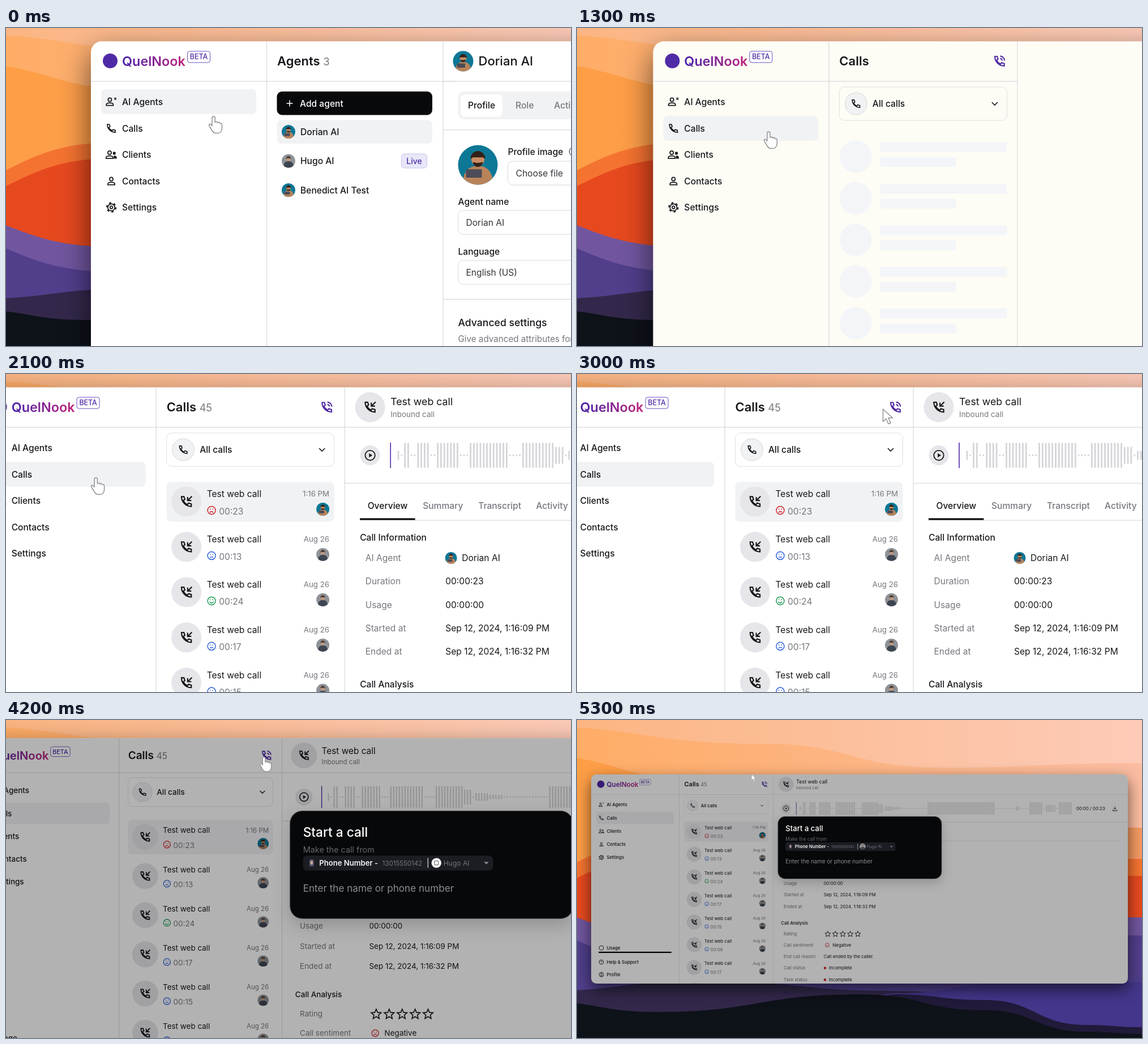
Recreate the animation shown at these times as an HTML page. Size 998 by 561 pixels, loop 5.6 s.

```html
<!DOCTYPE html>
<html lang="en">
<head>
<meta charset="utf-8">
<title>Call centre walkthrough</title>
<style>
html, body { margin: 0; width: 100%; height: 100%; overflow: hidden; background: #0d1119; }
svg { display: block; width: 998px; height: 561px; font-family: Inter, sans-serif; }
text { white-space: pre; }
.shadow { filter: drop-shadow(0 20px 27px rgba(0, 0, 0, .6)); }
.glow { filter: drop-shadow(0 14px 18px rgba(0, 0, 0, .18)); }
</style>
</head>
<body>
<svg id="stage" viewBox="0 0 998 561"></svg>
<script>
const INK = '#17181c', GRAY = '#77777f', LINE = '#d9d9de', SOFT = '#f1f2f4', DISC = '#e6e6ea', BONE = '#f4f5f9',
  PURPLE = '#4f2aa6', RED = '#d3222c', BLUE = '#2f62d9', GREEN = '#1f9d55';
const PERSONA = 'Dorian AI', SECOND = 'Hugo AI';

// Drawing helpers; y of a text is the middle of its capitals
const text = (x, y, s, size = 15.6, fill = INK, weight = 400, anchor = 'start') =>
  `<text x="${x}" y="${y + size * .36}" font-size="${size}" fill="${fill}" font-weight="${weight}" text-anchor="${anchor}">${s}</text>`;
const rect = (x, y, w, h, r, fill, stroke = 'none', more = '') =>
  `<rect x="${x}" y="${y}" width="${w}" height="${h}" rx="${r}" fill="${fill}" stroke="${stroke}" ${more}/>`;
const disc = (x, y, r, fill = 'none', more = '') => `<circle cx="${x}" cy="${y}" r="${r}" fill="${fill}" ${more}/>`;
const path = (d, fill = 'none', more = '') => `<path d="${d}" fill="${fill}" ${more}/>`;
const hline = (x, y, to) => rect(x, y - .5, to - x, 1.2, 0, LINE);
const vline = x => rect(x - .5, 23, 1.2, 740, 0, LINE);
const repeat = (n, draw) => Array.from({ length: n }, (_, i) => draw(i)).join('');

const PHONE = 'M4 4h4l1.5 4.5-2.5 2a14 14 0 0 0 6.5 6.5l2-2.5L20 16v4A16 16 0 0 1 4 4z';
const PERSON = 'M12 4.5a3.5 3.5 0 1 1 0 7a3.5 3.5 0 0 1 0-7M5 19.5v-1.5c0-2.5 4-3.5 7-3.5s7 1 7 3.5v1.5z';
const ICONS = {
  phone: path(PHONE),
  inbound: path(PHONE + 'M21 3.5l-6.5 6.5M14 4.5V10.3h6'),
  talk: path(PHONE + 'M13 3.5a8 8 0 0 1 7.5 7.5M13 7.5a4 4 0 0 1 3.5 3.5'),
  person: path(PERSON),
  agent: path(PERSON, 'none', 'transform="translate(-3 0)"') + path('M18 4l4 4m0-4l-4 4', 'none', 'stroke-width="1.6"'),
  people: path(PERSON, 'none', 'transform="translate(-3.5 0)"') +
    disc(18, 9, 1.9, 'currentColor') + path('M18 15c2 0 4 1 4 3v1h-4z', 'currentColor'),
  account: disc(12, 12, 9) + disc(12, 9.5, 2.5) + path('M6 18.5q6-5.500 12 0'),
  gear: disc(12, 12, 7) + disc(12, 12, 2.6) + disc(12, 12, 9.2, 'none', 'stroke-width="2.5" stroke-dasharray="4.4 5.234"'),
  ring: disc(12, 12, 9),
  help: disc(12, 12, 9) + path('M9.5 10a2.5 2.5 0 1 1 3.5 2.3q-1 .5-1 1.7M12 16v1.5'),
  play: disc(12, 12, 9.5) + path('M10 8l6.5 4-6.5 4z', 'currentColor', 'stroke="none"'),
  down: path('M6 9l6 6 6-6'),
  save: path('M12 4v11M7 11l5 5 5-5M4 17v4h16v-4'),
  star: path('M12 2l3 7 7.5.6-5.7 5 1.7 7.4-6.5-4-6.5 4 1.7-7.4-5.7-5L9 9z')
};
const icon = (name, x, y, size = 21, color = INK) =>
  `<g transform="translate(${x} ${y}) scale(${size / 24}) translate(-12 -12)" fill="none" stroke="currentColor" color="${color}" stroke-width="2">${ICONS[name]}</g>`;

const MOODS = { [RED]: 'M-3.2 4q3.2-4 6.4 0', [BLUE]: 'M-3 2.5h6', [GREEN]: 'M-3.5 1.5q3.5 4.5 7 0' };
const mood = (x, y, color) => `<g transform="translate(${x} ${y})" stroke="${color}" stroke-width="1.5">` +
  disc(0, 0, 7) + path(MOODS[color] + 'M-3-2h1.5M1.5-2h1.5') + '</g>';

const LOOKS = [['#0d7796', '#b9835a', '#c98d66', '#33221a'], ['#8f9398', '#3d4552', '#bd9880', '#4c3c33']];
const avatar = (x, y, r, look = 0) => {
  const [back, coat, skin, hair] = LOOKS[look];
  return `<g transform="translate(${x} ${y}) scale(${r})">` + disc(0, 0, 1, back) +
    path('M-.74 .67A1 1 0 0 0 .74 .67Q.6 .05 0 .05T-.74 .67z', coat) + disc(0, -.27, .33, skin) +
    path('M-.37-.3a.37.4 0 0 1 .74 0l-.12-.08h-.5z', hair) +
    (look ? '' : path('M-.25-.15q.25.1.5 0a.25.25 0 0 1-.5 0', hair) + rect(-.6, .22, .8, .42, .05, '#4c4b58')) + '</g>';
};

// Smooth hill line through the points, filled down to the bottom edge
const wave = (fill, ...p) => path(p.reduce((d, [x, y], i) => {
  if (!i) return `M${x} ${y}`;
  const [px, py] = p[i - 1], mid = (px + x) / 2;
  return `${d}C${mid} ${py} ${mid} ${y} ${x} ${y}`;
}, '') + 'V561H0z', fill);
const gradient = (id, from, to) => `<linearGradient id="${id}"><stop stop-color="${from}"/><stop offset="1" stop-color="${to}"/></linearGradient>`;

const backdrop = rect(0, 0, 998, 561, 0, 'url(#sky)') +
  wave('url(#dawn)', [-100, 10], [330, 42], [640, 84], [998, 76]) +
  wave('url(#noon)', [-100, 60], [250, 110], [600, 150], [998, 190]) +
  wave('#f57331', [-170, 290], [190, 202], [998, 245]) +
  wave('#e7491f', [-170, 318], [190, 230], [998, 275]) +
  wave('#71569f', [-170, 318], [190, 386], [998, 348]) +
  wave('#513f8c', [-170, 356], [190, 430], [998, 380]) +
  wave('#33284b', [-60, 478], [220, 460], [560, 478], [998, 540]) +
  wave('#44368a', [560, 482], [780, 462], [998, 462]) +
  wave('#211a3a', [560, 484], [720, 494], [900, 538], [998, 542]) +
  wave('#0e1219', [-60, 497], [140, 515], [500, 484], [720, 512], [900, 550], [998, 554]);

const NAV = [['agent', 'AI Agents', 130], ['phone', 'Calls', 177], ['people', 'Clients', 223.5], ['person', 'Contacts', 270],
  ['gear', 'Settings', 316.5], ['ring', 'Usage', 635.5], ['help', 'Help &amp; Support', 685.5], ['account', 'Profile', 729.5]];
const sidebar = disc(34, 58, 13, PURPLE) + text(55, 58.5, 'QuelNook', 23.4, 'url(#brand)', 600) +
  rect(170.5, 41, 40, 20, 4, '#fff', '#6a4fc0') + text(190.5, 51, 'BETA', 12.4, PURPLE, 500, 'middle') +
  `<g id="active">${rect(18, 108, 274, 44, 8, SOFT)}</g>` +
  NAV.map(([name, label, y]) => icon(name, 36, y) + text(55, y, label, 15.6, INK, 500)).join('') +
  rect(26, 649, 258, 4.5, 2, '#000') + vline(310.5) + hline(0, 94, 643.5);

const field = (x, y, label) => rect(x, y, 700, 42, 9, '#fff', LINE) + text(x + 14, y + 21, label, 15.6, '#333439');
const agentRow = (y, label, look) => avatar(349, y, 12, look) + text(370, y, label, 15.6, INK, 500);
const agents = vline(622) + hline(622, 94, 1896) + text(329, 58.5, 'Agents', 22, INK, 600) + text(410.5, 60, '3', 18, GRAY) +
  rect(328.5, 112, 274.5, 41.5, 9, '#08090b') + path('M345.5 133h11M351 127.5v11', 'none', 'stroke="#fff" stroke-width="1.5"') +
  text(369, 133, 'Add agent', 15.6, '#fff', 500) + rect(328.5, 162.5, 274.5, 41.5, 8, SOFT) +
  agentRow(183, PERSONA, 0) + agentRow(234.5, SECOND, 1) + agentRow(286, 'Benedict AI Test', 0) +
  rect(548.5, 222, 45, 25, 5, '#e7e7f8', '#c6c4ee') + text(571, 234.5, 'Live', 14, PURPLE, 500, 'middle') +
  avatar(657.5, 58.5, 18) + text(684.5, 58.5, PERSONA, 22, INK, 500) +
  rect(648.5, 112, 700, 49, 10, SOFT) + rect(653, 117, 74, 39.5, 8, '#fff') + text(666, 136.5, 'Profile', 15.6, INK, 500) +
  text(750, 136.5, 'Role', 15.6, GRAY, 500) + text(818, 136.5, 'Actions', 15.6, GRAY, 500) + hline(622, 179.5, 1896) +
  avatar(683.5, 241.5, 35) + text(736.5, 218.5, 'Profile image', 15.6, INK, 500) + disc(853, 218, 8, 'none', `stroke="${INK}"`) +
  field(736.5, 235, 'Choose file') + text(648.5, 306.5, 'Agent name', 15.6, INK, 500) + field(648.5, 322, PERSONA) +
  text(648.5, 394, 'Language', 15.6, INK, 500) + field(648.5, 410, 'English (US)') + hline(622, 478.5, 1896) +
  text(648.5, 519.5, 'Advanced settings', 17.6, INK, 500) + text(648.5, 549, 'Give advanced attributes for this agent', 15.2, GRAY);

const listHead = vline(643.5) + text(329, 58.5, 'Calls', 22, INK, 600) + icon('talk', 612, 58.5, 25, PURPLE) +
  rect(329, 104, 296, 59, 9, 'none', '#dfdfe4') + disc(358.5, 133.5, 19.5, SOFT, 'stroke="#d6d6dc"') + icon('phone', 358.5, 133.5, 20) +
  text(387.5, 133.5, 'All calls', 15.6, INK, 500) + icon('down', 603.5, 133.5, 20);

const skeleton = repeat(8, i => {
  const y = 227 + 73.4 * i;
  return disc(358, y, 28.5, BONE) + rect(400.5, y - 25.5, 224.5, 17, 2, BONE) + rect(400.5, y + 1, 134.5, 17, 2, BONE);
});

const CALLS = [['23', RED], ['13', BLUE], ['24', GREEN], ['17', BLUE], ['15', BLUE], ['08', BLUE], ['17', BLUE], ['12', BLUE]];
const callRow = ([seconds, color], i) => `<g transform="translate(0 ${79.9 * i})">` +
  disc(364, 225, 26.5, DISC) + icon('inbound', 364, 225, 26) + text(400, 211.5, 'Test web call') +
  text(616.5, 211.5, i ? 'Aug 26' : '1:16 PM', 13.3, GRAY, 400, 'end') + mood(408.5, 240.5, color) +
  text(421.5, 242, '00:' + seconds, 15.6, GRAY) + avatar(605, 238.5, 11.5, i ? 1 : 0) + '</g>';

// Loud stretches of the recording: start, end, bar height
const LOUD = [[737, 742, 16], [745, 757, 44], [768, 791, 44], [803, 843, 44], [861, 934, 44], [956, 1012, 44], [1014, 1032, 30],
  [1034, 1062, 16], [1066, 1092, 9], [1188, 1422, 44], [1500, 1512, 16], [1546, 1592, 44], [1604, 1640, 24], [1652, 1698, 44]];
const waveform = repeat(166, i => {
  const x = 737 + 5.8 * i, [, , h] = LOUD.find(([a, b]) => x >= a && x <= b) || [0, 0, 3];
  return rect(x, 143.5 - h / 2, 2.8, h, 1, '#d5d5da');
});
const detail = (y, label, value = '', x = 821.5) => text(680, y, label, 15.6, GRAY) + text(x, y, value);
const TABS = [['Summary', 781.5], ['Transcript', 879.5], ['Activity', 981.5]];

const calls = text(387, 60, '45', 18, GRAY) + rect(329, 190.5, 296, 70, 8, SOFT) + CALLS.map(callRow).join('') +
  hline(643.5, 94, 1896) + disc(688.5, 58.5, 26.5, DISC) + icon('inbound', 688.5, 58.5, 26) +
  text(724.5, 49, 'Test web call', 17.8) + text(724.5, 71.5, 'Inbound call', 13.5, GRAY) +
  disc(688.5, 143.5, 17.5, DISC) + icon('play', 688.5, 143.5, 22) + waveform + rect(723.8, 121, 1.6, 45, 0, PURPLE) +
  text(1714, 143.5, '00:00 / 00:23') + icon('save', 1850, 143.5, 22) + hline(643.5, 192.5, 1896) +
  text(684, 232, 'Overview', 15.6, INK, 500) + TABS.map(([label, x]) => text(x, 232, label, 15.6, GRAY, 500)).join('') +
  hline(670.5, 258, 1864) + rect(670.5, 254.5, 97.5, 3, 0, '#000') + text(670.5, 288, 'Call Information', 15.6, INK, 500) +
  detail(324.5, 'AI Agent', PERSONA, 850.5) + avatar(831.5, 324.5, 10.5) + detail(365.5, 'Duration', '00:00:23') +
  detail(407, 'Usage', '00:00:00') + detail(448, 'Started at', 'Sep 12, 2024, 1:16:09 PM') +
  detail(489, 'Ended at', 'Sep 12, 2024, 1:16:32 PM') + text(670.5, 547, 'Call Analysis', 15.6, INK, 500) +
  detail(585.5, 'Rating') + repeat(5, i => icon('star', 836 + 26.5 * i, 586, 23)) +
  detail(625.5, 'Call sentiment', 'Negative', 853) + mood(834, 625.5, RED) +
  detail(666, 'End call reason', 'Call ended by the caller.') +
  [[706.5, 'Call status'], [748, 'Task status']].map(([y, label]) => detail(y, label, 'Incomplete', 840) + disc(826, y, 4.5, RED)).join('');

const modal = rect(0, 23.5, 1896, 738, 0, 'rgba(0,0,0,.3)') + rect(660, 172, 578, 219.5, 25, '#07080a', '#3a3b3d', 'class="glow"') +
  text(686.5, 215, 'Start a call', 26.2, '#fff', 500) + text(686.5, 251.5, 'Make the call from', 16.7, '#66686c') +
  rect(686.5, 263, 388.5, 30.5, 8, '#1b1d22') + rect(699.5, 271, 9, 14, 2, '#55506e') + rect(701.5, 274, 5, 7, 1, '#c9a98f') +
  text(719.5, 278.5, 'Phone Number -', 15.2, '#f4f4f5', 600) + text(848.5, 278.5, '13015550142', 13.3, '#74767b') +
  rect(941, 268, 1.5, 20, 0, '#d5d5d8') + disc(959, 278, 10, '#fff') + rect(955, 274, 8, 8, 1.5, 'none', '#777', 'stroke-width="1.5"') +
  `<g id="photo">${avatar(959, 278, 10, 1)}</g>` + text(973.5, 278.5, SECOND, 14, '#74767b') +
  path('M1056 276h10l-5 5z', '#85878c') + text(686.5, 329.5, 'Enter the name or phone number', 19.8, '#8b8d94');

const HAND = 'M-3 2.5a2.6 2.6 0 0 1 5.2 0v8a2.5 2.5 0 0 1 4.6.8a2.4 2.4 0 0 1 4.3 1.2a2.2 2.2 0 0 1 3.4 2v6c0 5-3 9-7 9h-4c-3 0-5-2-6.5-4.5l-5-8.5c-1.4-2.6 1.2-4.2 3-2.5l2 2.4z';
const ARROW = 'M0 0v22l5.5-5 4 9 4-1.8-4-8.7h7.5z';

const $ = id => document.getElementById(id);
const group = (id, body) => `<g id="${id}">${body}</g>`;
$('stage').innerHTML = '<defs>' + gradient('sky', '#fbb582', '#fdcbb8') + gradient('dawn', '#ffab60', '#fbbda2') +
  gradient('noon', '#ff9f43', '#f59a63') + gradient('brand', '#4a24ab', '#c0247c') +
  `<clipPath id="pane">${rect(0, 23.5, 1896, 738, 19, '#000')}</clipPath></defs>` + backdrop +
  group('app', rect(0, 23.5, 1896, 738, 19, '#fff', 'none', 'id="paper" class="shadow"') +
    `<g clip-path="url(#pane)">${sidebar}${group('agents', agents)}${group('listHead', listHead)}${group('skeleton', skeleton)}${group('calls', calls)}${group('modal', modal)}</g>` +
    '<path id="cursor" fill="#fff" stroke="#909196" stroke-width="1.5" stroke-linejoin="round"/>');

const clamp = v => Math.min(1, Math.max(0, v));
const ease = u => u < .5 ? 4 * u ** 3 : 1 - 4 * (1 - u) ** 3;
const spring = u => u <= 0 ? 0 : 1 - (1 + u) * Math.exp(-u);
const show = (id, on) => $(id).style.display = on ? '' : 'none';
// Pointer moves: start, end, dx, dy
const MOVES = [[0, 700, -12.5, 27], [2350, 3000, 385.5, -121], [3000, 3300, 17, 0], [4850, 5300, -41, -39.5]];

function draw(t) {
  const pan = t > 2200 ? 1 : spring((t - 1231) / 150), out = ease(clamp((t - 3670) / 1300));
  const zoom = 2 - out, cx = 199.5 + 99.75 * pan + 199.75 * out, cy = 224.5 + 56 * out;
  const left = 499 + (25 - cx) * zoom, top = 280.5 + (96 - cy) * zoom;
  $('app').setAttribute('transform', `translate(${left} ${top}) scale(${zoom / 2}) translate(0 -23.5)`);

  const opened = t >= 1100, loading = opened && t < 1600;
  show('agents', !opened);
  show('listHead', opened);
  show('skeleton', loading);
  show('calls', opened && !loading);
  show('photo', t >= 4500);
  $('active').setAttribute('transform', `translate(0 ${opened ? 47 : 0})`);
  $('paper').setAttribute('fill', loading ? '#fdfcf5' : '#fff');
  $('modal').setAttribute('opacity', clamp((t - 3650) / 100));

  let x = 217, y = 156;
  for (const [start, end, dx, dy] of MOVES) {
    const k = ease(clamp((t - start) / (end - start)));
    x += dx * k;
    y += dy * k;
  }
  const arrow = t >= 2500 && t < 3200 || t >= 4900;
  $('cursor').setAttribute('d', arrow ? ARROW : HAND);
  $('cursor').setAttribute('transform', `translate(${x} ${y})`);
}

// The picture advances ten times a second
const begin = performance.now();
function tick() {
  draw(Math.floor((performance.now() - begin) % 5600 / 100) * 100);
  requestAnimationFrame(tick);
}
tick();
</script>
</body>
</html>
```
